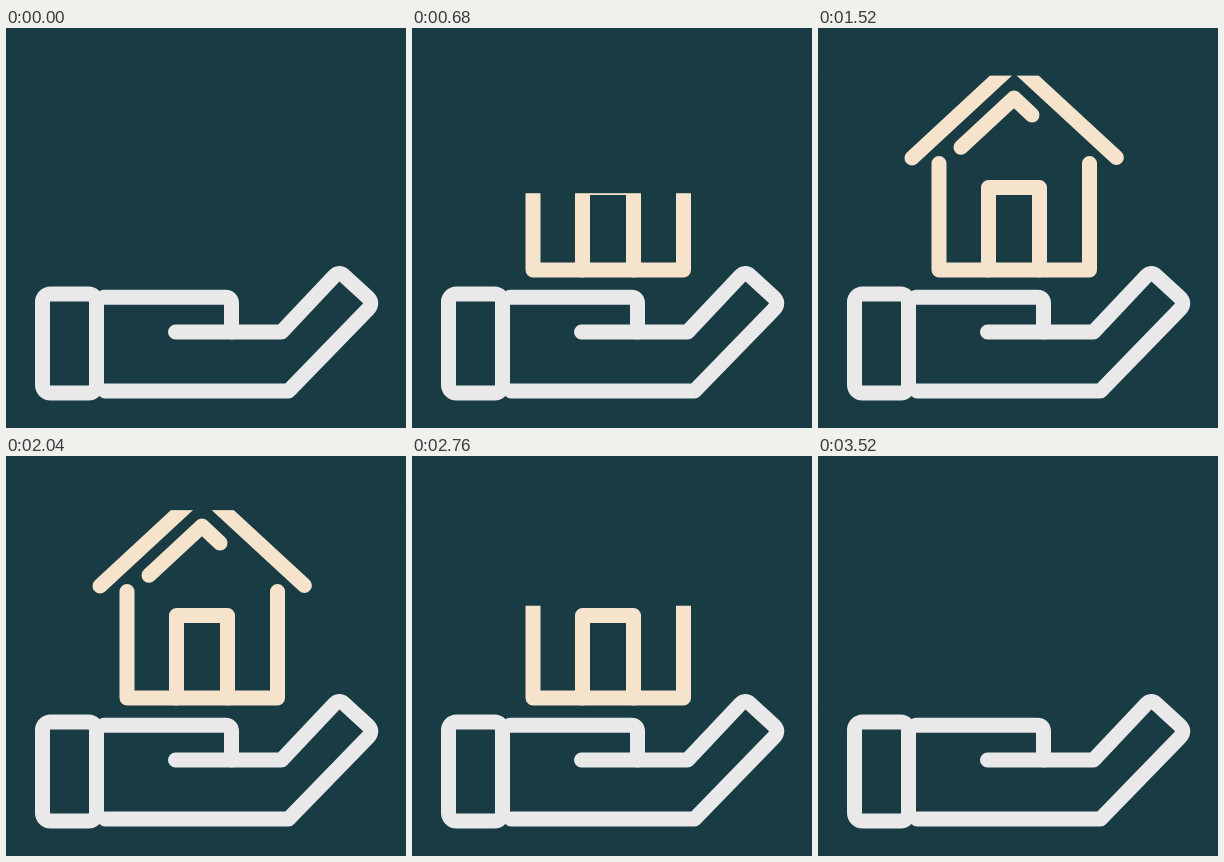
These frames come from a looping animation (400x400 px, 3.6 s). An HTML page:

```html
<!DOCTYPE html>
<html lang="en">
<head>
<meta charset="utf-8">
<title>House in hand</title>
<style>
  html, body { margin: 0; width: 100%; height: 100%; overflow: hidden; background: #183b44; }
  svg { position: absolute; inset: 0; width: 100%; height: 100%; display: block; }
  path, rect { fill: none; stroke-width: 15; stroke-linecap: round; stroke-linejoin: round; }
  .hand { stroke: #e9e9e9; }
  .house { stroke: #f5e3cb; }

  /* The cover's lower edge climbs past the roof, rests, then comes back down. */
  .cover { fill: #183b44; animation: wipe 3600ms infinite; }
  @keyframes wipe {
    0%       { transform: translateY(260px);   animation-timing-function: step-end; }
    2.2222%  { transform: translateY(249.2px); animation-timing-function: steps(40, end); }
    46.6666% { transform: translateY(25.2px);  animation-timing-function: step-end; }
    51.1111% { transform: translateY(27.6px);  animation-timing-function: steps(42, end); }
    97.7777% { transform: translateY(250.6px); animation-timing-function: step-end; }
    100%     { transform: translateY(260px); }
  }
</style>
</head>
<body>
<svg viewBox="0 0 400 400">
  <g class="house">
    <path d="M94 130 L196.3 35.2 L298.4 129.5"/>
    <path d="M143 119.3 L196 70 L214 87"/>
    <path d="M121 135.5 V242 H271.5 V135.5"/>
    <path d="M170.5 242 V159.5 H221.5 V242"/>
  </g>
  <rect class="cover" y="-400" width="400" height="400"/>
  <g class="hand">
    <rect x="36.5" y="266" width="54" height="99" rx="8"/>
    <path d="M98 269.3 H219.5 Q225.5 269.3 225.5 275.5 V304"/>
    <path d="M169.5 304 H275.5 L328.2 248.1 Q333 243 338.2 247.7
             L361.4 269 Q368 275 361.7 281.5 L282.5 363 H99"/>
  </g>
</svg>
</body>
</html>
```
